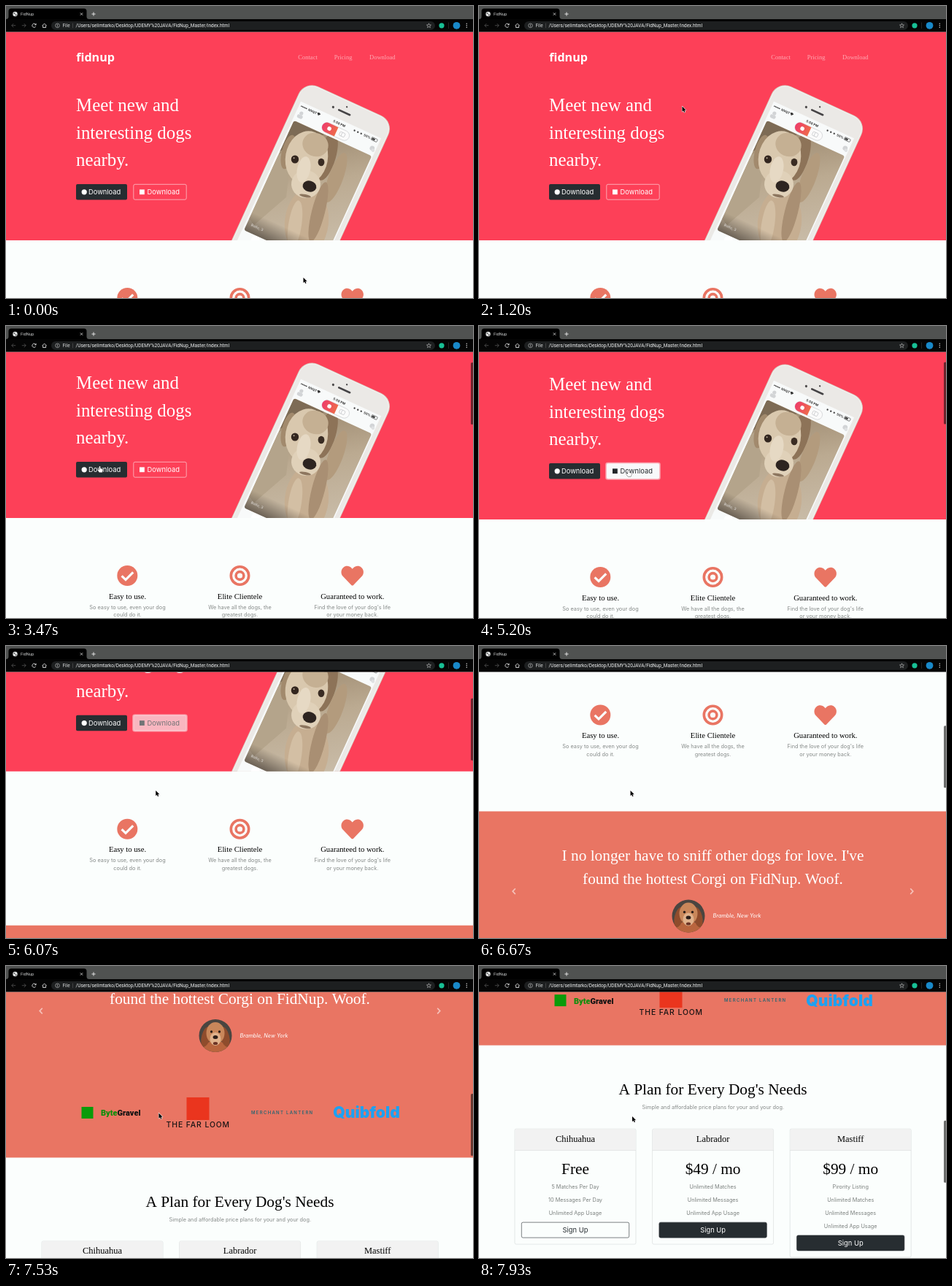
An HTML page with a canvas that plays this animation: 640x400 px, repeating every 8000 ms.

```html
<!DOCTYPE html>
<html lang="en">
<head>
<meta charset="utf-8">
<title>FidNup</title>
<style>
  html, body { margin: 0; width: 100%; height: 100%; overflow: hidden; background: #fbfefd; }
  canvas { display: block; width: 640px; height: 400px; }
</style>
</head>
<body>
<canvas id="stage"></canvas>
<script>
const LOOP = 8000, TOP = 35.5, HERO_END = 321;
const SERIF = '"Liberation Serif", Times, serif';
const SANS = 'Inter, sans-serif';
const UI = 'Roboto, sans-serif';
const RED = '#fd4058', CORAL = '#e97563', PAPER = '#fbfefd', DARK = '#272d31', GREY = '#868a89';

const canvas = document.getElementById('stage');
const ctx = canvas.getContext('2d');
const dpr = window.devicePixelRatio || 1;
canvas.width = 640 * dpr;
canvas.height = 400 * dpr;

// [time, value...] keys
const scrollKeys = [[0, 0], [1830, 0], [2130, 30], [2600, 55], [2900, 58], [3700, 58],
  [4200, 56], [5680, 56], [6070, 149], [7200, 460], [7930, 733.5], [8000, 757]];
const cursorKeys = [[0, 407.5, 372], [65, 407.5, 372], [135, 410, 306], [260, 410, 306],
  [1150, 278.5, 137.5], [2500, 278.5, 137.5], [3300, 128.5, 192], [3650, 128.5, 192],
  [4250, 204.5, 197], [5900, 205, 198], [7200, 209, 198], [7930, 210, 206]];

const clamp = v => Math.max(0, Math.min(1, v));
const ease = v => { v = clamp(v); return v * v * (3 - 2 * v); };
const mix = (a, b, k) => a + (b - a) * k;

function segment(keys, t) {
  let i = 0;
  while (i < keys.length - 2 && t >= keys[i + 1][0]) i++;
  return i;
}

// Monotone cubic through the scroll keys
function scrollAt(t) {
  const k = scrollKeys;
  const rate = i => k[i + 1] && k[i] ? (k[i + 1][1] - k[i][1]) / (k[i + 1][0] - k[i][0]) : 0;
  const slope = i => {
    const a = rate(i - 1), b = rate(i);
    return a * b > 0 ? 2 * a * b / (a + b) : 0;
  };
  const i = segment(k, t), h = k[i + 1][0] - k[i][0];
  const u = clamp((t - k[i][0]) / h), v = 1 - u;
  return v * v * (1 + 2 * u) * k[i][1] + u * u * (3 - 2 * u) * k[i + 1][1]
    + h * u * v * (v * slope(i) - u * slope(i + 1));
}

function cursorAt(t) {
  const i = segment(cursorKeys, t);
  const [t0, x0, y0] = cursorKeys[i], [t1, x1, y1] = cursorKeys[i + 1];
  const u = ease((t - t0) / (t1 - t0));
  return [mix(x0, x1, u), mix(y0, y1, u)];
}

function text(s, x, y, font, color, align = 'left', spacing = 0) {
  ctx.font = font;
  ctx.fillStyle = color;
  ctx.textAlign = align;
  ctx.letterSpacing = spacing + 'px';
  ctx.fillText(s, x, y);
}
function rect(x, y, w, h, color) {
  ctx.fillStyle = color;
  ctx.fillRect(x, y, w, h);
}
function round(x, y, w, h, r, fill, stroke, lw = 0.6) {
  ctx.beginPath();
  ctx.roundRect(x, y, w, h, r);
  paint(fill, stroke, lw);
}
function paint(fill, stroke, lw) {
  if (fill) { ctx.fillStyle = fill; ctx.fill(); }
  if (stroke) { ctx.strokeStyle = stroke; ctx.lineWidth = lw; ctx.stroke(); }
}
function oval(x, y, rx, ry, color, turn = 0) {
  ctx.beginPath();
  ctx.ellipse(x, y, rx, ry, turn, 0, 7);
  paint(color);
}
const disc = (x, y, r, color) => oval(x, y, r, r, color);
function ring(x, y, r, lw, color) {
  ctx.beginPath();
  ctx.arc(x, y, r, 0, 7);
  paint(null, color, lw);
}
function line(color, lw, ...p) {
  ctx.beginPath();
  for (let i = 0; i < p.length; i += 2) ctx.lineTo(p[i], p[i + 1]);
  paint(null, color, lw);
}
function poly(fill, ...p) {
  ctx.beginPath();
  for (let i = 0; i < p.length; i += 2) ctx.lineTo(p[i], p[i + 1]);
  ctx.closePath();
  paint(fill);
}
function shade(x0, y0, x1, y1, ...stops) {
  const g = ctx.createLinearGradient(x0, y0, x1, y1);
  stops.forEach((c, i) => g.addColorStop(i / (stops.length - 1), c));
  return g;
}
function within(draw, place) {
  ctx.save();
  place();
  draw();
  ctx.restore();
}

function browser() {
  rect(0, 0, 640, 18, '#505251');
  ctx.beginPath();
  ctx.moveTo(0, 18);
  ctx.quadraticCurveTo(3.5, 18, 3.5, 14.5);
  ctx.lineTo(3.5, 7);
  ctx.quadraticCurveTo(3.5, 3.5, 7, 3.5);
  ctx.lineTo(107, 3.5);
  ctx.quadraticCurveTo(110.5, 3.5, 110.5, 7);
  ctx.lineTo(110.5, 14.5);
  ctx.quadraticCurveTo(110.5, 18, 114, 18);
  paint('#000');
  rect(0, 18, 640, TOP - 18, '#050505');

  disc(12.5, 11, 3.2, '#e4e6e6');
  oval(11.5, 10, 1.2, 0.8, '#333');
  oval(13.6, 12.3, 1.1, 0.7, '#333');
  text('FidNup', 20, 13.1, '5.7px ' + UI, '#d2d4d4');
  line('#ddd', 0.8, 101.8, 9.3, 105.2, 12.7);
  line('#ddd', 0.8, 105.2, 9.3, 101.8, 12.7);
  line('#eee', 0.9, 117.4, 11, 122.6, 11);
  line('#eee', 0.9, 120, 8.4, 120, 13.6);

  for (const [x, d] of [[10.5, -1], [24.5, 1]]) {
    line('#555', 0.8, x - 2.7, 26.7, x + 2.7, 26.7);
    line('#555', 0.8, x + d * 0.3, 24.2, x + d * 2.7, 26.7, x + d * 0.3, 29.2);
  }
  ctx.beginPath();
  ctx.arc(38.5, 26.7, 2.6, 0.5, 5.6);
  paint(null, '#ddd', 0.9);
  poly('#ddd', 41.5, 23.6, 41.5, 26.2, 38.9, 26.2);
  line('#ddd', 0.9, 49.6, 27, 52.6, 24, 55.6, 27);
  line('#ddd', 0.9, 50.6, 26.6, 50.6, 29.5, 54.6, 29.5, 54.6, 26.6);

  round(62, 21, 526, 11.8, 5.9, '#1d1f20');
  ring(70.5, 26.8, 2.8, 0.6, '#d0d2d2');
  line('#d0d2d2', 0.7, 70.5, 26.4, 70.5, 28.4);
  rect(70.1, 25, 0.8, 0.8, '#d0d2d2');
  text('File', 77.5, 29.1, '6.4px ' + UI, '#d8dada');
  rect(91, 23.5, 0.5, 6.6, '#666');
  text('/Users/selimtarko/Desktop/UDEMY%20JAVA/FidNup_Master/index.html', 95.5, 29.1, '6.5px ' + UI, '#f2f4f4');

  ctx.beginPath();
  for (let i = 0; i < 10; i++) {
    const a = i * Math.PI / 5 - Math.PI / 2, r = i % 2 ? 1.4 : 3.2;
    ctx.lineTo(579.5 + r * Math.cos(a), 27 + r * Math.sin(a));
  }
  ctx.closePath();
  paint(null, '#ccc', 0.6);
  disc(597, 26.8, 3.6, '#17c095');
  rect(606, 22.5, 0.5, 8.5, '#444');
  disc(617.5, 26.8, 4.9, '#1989c9');
  for (const y of [24.3, 26.8, 29.3]) disc(631.3, y, 0.7, '#ddd');
}

function dogPhoto() {
  rect(300, 100, 240, 230, shade(390, 160, 420, 330, '#978369', '#bbaa91', '#c9bca8'));
  poly('#7d6b55', 390, 155, 436, 176, 390, 190, 374, 200);
  poly('#b4a48b', 372, 205, 392, 192, 384, 262, 340, 300, 332, 290);
  oval(440, 206, 12, 34, '#8d7358', 0.28);
  oval(452, 235, 10, 36, '#b39b7d', 0.35);
  oval(412, 296, 30, 46, '#c6ae91', 0.1);
  oval(428, 282, 9, 42, '#a98f73', 0.25);
  oval(396, 300, 9, 34, '#d3bfa4', 0.15);
  oval(387, 200, 9, 24, '#a28a6d', 0.25);
  oval(412, 208, 29, 37, '#d9c8ae', 0.18);
  oval(424, 190, 18, 16, '#c5b093', 0.4);
  oval(411, 244, 20, 19, '#e0d1b9', 0.15);
  oval(408, 224, 9, 18, '#e6d9c4', 0.2);
  oval(396, 210, 5.2, 5.6, '#33261f');
  oval(432, 214, 4.4, 5.2, '#3a2c23');
  disc(394.6, 208.2, 1, '#b9aa98');
  oval(416, 247, 9.5, 7.5, '#2d2420', 0.25);
  oval(410, 260, 8, 2, '#8d765f', 0.2);
}

function phone() {
  const place = () => { ctx.translate(470.9, 130.1); ctx.rotate(24.6 * Math.PI / 180); };
  within(() => {
    round(-67.7, 0, 135.4, 290, 20, '#d8cdc2');
    round(-66.3, 1.3, 132.6, 290, 19, '#ebe9e6', '#faf8f6', 0.8);
    rect(-60.5, 28.5, 121, 260, '#f8fafa');
    disc(-17, 17, 1.6, '#4c4a4b');
    disc(0, 9, 1.2, '#4c4a4b');
    round(-9.5, 16, 19, 2.6, 1.3, '#464446');
    const small = '700 4.4px ' + SANS;
    for (let i = 0; i < 5; i++) disc(-57 + i * 1.9, 34, 0.8, '#333');
    text('NVQT', -46.5, 35.7, small, '#333');
    ctx.beginPath();
    ctx.moveTo(-31, 36);
    ctx.arc(-31, 36, 3.8, -2.3, -0.84);
    paint('#333');
    text('5:58 PM', 0, 35.7, small, '#333', 'center');
    for (let i = 0; i < 3; i++) disc(23 + i * 5, 34, 1.2, '#444');
    text('50%', 37, 35.7, small, '#333');
    round(48.5, 32, 8.5, 4, 0.8, null, '#444', 0.6);
    rect(49.2, 32.7, 4.5, 2.6, '#444');
    disc(-53, 43, 2.6, '#d2d4d6');
    round(-57, 45.4, 8, 5, 2.4, '#d2d4d6');
    disc(55, 46, 3.3, '#d2d4d6');
    disc(57.2, 48.2, 2.3, '#dfe1e2');
    round(-20, 39.2, 40, 13.6, 6.8, '#fbfbfb', '#cfd0d2', 0.7);
    round(-20, 39.2, 21, 13.6, [6.8, 0, 0, 6.8], shade(-20, 0, 1, 0, '#ee3d6a', '#ee6a4c'));
    disc(-9.5, 46, 2.8, '#fff');
    round(6, 43.2, 4.6, 5.4, 1, null, '#c3c5c8', 0.7);
    round(9, 43.2, 4.6, 5.4, 1, '#fbfbfb', '#c3c5c8', 0.7);
    disc(-38, 227, 6, '#fff');
  }, place);
  within(dogPhoto, () => {
    within(() => {}, () => {});
    const m = ctx.getTransform();
    place();
    ctx.beginPath();
    ctx.roundRect(-58, 56, 117, 165, 3);
    ctx.clip();
    ctx.setTransform(m);
  });
  within(() => {
    round(-58, 194, 117, 27, [0, 0, 3, 3], shade(0, 194, 0, 221, 'rgba(50,42,36,0)', 'rgba(50,42,36,.6)'));
    text('Rollo, 3', -52, 212, '600 5px ' + SANS, 'rgba(255,255,255,.6)');
  }, place);
}

function downloadButtons(hover, focus) {
  const font = '9.35px ' + SANS;
  round(96, 244, 70, 21.5, 2, DARK);
  disc(107.2, 254.8, 3.6, '#fff');
  text('Download', 113, 258.1, font, '#fff');
  if (focus) round(173.2, 242.8, 75.6, 23.9, 3.2, `rgba(248,249,250,${0.5 * focus})`);
  if (focus) round(174.6, 244.2, 72.8, 21.1, 2, RED);
  const c = [33, 37, 41].map(v => Math.round(mix(255, v, hover)));
  const ink = `rgb(${c})`;
  round(174.8, 244.3, 72.4, 20.9, 2, `rgba(248,249,250,${hover})`, '#fbeff0', 0.6);
  rect(183, 251.4, 6.8, 6.8, ink);
  text('Download', 193.6, 258.1, font, ink);
}

function hero(hover, focus) {
  rect(0, 0, 640, HERO_END, RED);
  text('fidnup', 96.3, 75.8, '700 16.1px "Open Sans", sans-serif', '#fff');
  [['Contact', 400.3], ['Pricing', 449.8], ['Download', 498]].forEach(([s, x]) =>
    text(s, x, 72.6, '8.53px ' + SERIF, 'rgba(255,255,255,.55)'));
  ['Meet new and', 'interesting dogs', 'nearby.'].forEach((s, i) =>
    text(s, 96, 144.2 + i * 37.4, '24.9px ' + SERIF, '#fff'));
  downloadButtons(hover, focus);
  within(phone, () => { ctx.beginPath(); ctx.rect(0, 0, 640, HERO_END); ctx.clip(); });
}

const heart = new Path2D('M462 63C408 16 326 24 276 76L256 97L236 76C186 24 105 16 50 63C-13 116-16 212 40 270L233 470C246 483 266 483 279 470L472 270C528 212 525 116 462 63Z');

function features() {
  disc(166.3, 400, 14, CORAL);
  ctx.lineJoin = 'miter';
  line(PAPER, 3.2, 158.6, 400.4, 164, 405.6, 174.2, 395.4);
  ring(320.5, 400, 12.2, 3.6, CORAL);
  ring(320.5, 400, 5.4, 3.6, CORAL);
  within(() => { ctx.fillStyle = CORAL; ctx.fill(heart); }, () => {
    ctx.translate(474.7, 400.2);
    ctx.scale(0.0595, 0.0595);
    ctx.translate(-256, -256);
  });
  [
    [166.5, 'Easy to use.', 'So easy to use, even your dog', 'could do it.'],
    [320.5, 'Elite Clientele', 'We have all the dogs, the', 'greatest dogs.'],
    [474.8, 'Guaranteed to work.', "Find the love of your dog's life", 'or your money back.']
  ].forEach(([x, head, a, b]) => {
    text(head, x, 431.6, '10.67px ' + SERIF, '#000', 'center');
    text(a, x, 445.6, '7.3px ' + SANS, GREY, 'center');
    text(b, x, 456.2, '7.3px ' + SANS, GREY, 'center');
  });
}

function portrait() {
  disc(287, 675.5, 22.5, '#4a4540');
  within(() => {
    oval(287, 700, 19, 18, '#b9653e');
    oval(274, 677, 6, 14, '#8f4c2c', 0.25);
    oval(300, 677, 6, 14, '#8f4c2c', -0.25);
    oval(287, 672, 12.5, 15, '#c9875a');
    oval(287, 680, 7.5, 9, '#e0b28c');
    oval(281.5, 670, 1.7, 1.8, '#2b1d18');
    oval(292.5, 670, 1.7, 1.8, '#2b1d18');
    oval(287, 677.5, 3.4, 2.5, '#2b1d18');
    oval(287, 686, 3.2, 2, '#6b3326');
  }, () => { ctx.beginPath(); ctx.arc(287, 675.5, 22.5, 0, 7); ctx.clip(); });
}

function testimonial() {
  rect(0, 532, 640, 310.5, CORAL);
  ["I no longer have to sniff other dogs for love. I've", 'found the hottest Corgi on FidNup. Woof.'].forEach((s, i) =>
    text(s, 320.5, 599.6 + i * 32, '21.33px ' + SERIF, '#fff', 'center'));
  portrait();
  text('Bramble, New York', 320.5, 677.8, 'italic 7.3px ' + SANS, '#fff');
  for (const [x, d] of [[48, -1], [593, 1]])
    line('rgba(255,255,255,.55)', 1.7, x - d * 1.8, 637.8, x + d * 1.8, 641.6, x - d * 1.8, 645.4);

  rect(103.5, 773, 16, 16, '#0a9b0a');
  const bold = '900 11px ' + UI;
  text('Byte', 130, 785.4, bold, '#0a8f0a');
  text('Gravel', 130 + ctx.measureText('Byte').width, 785.4, bold, '#111');
  rect(247.5, 760, 31, 31, '#ea351e');
  text('THE FAR LOOM', 263.3, 801, '500 10.4px ' + SANS, '#1a1414', 'center', 0.9);
  text('MERCHANT LANTERN', 378.7, 783, '600 6px ' + SANS, '#2f6672', 'center', 1.3);
  text('Quibfold', 494, 788.4, '900 21px ' + SANS, '#1da1f2', 'center');
}

function card(x, name, price, perks, filled) {
  const top = 957, button = 1067.2 + perks.length * 17.8 - 35.6;
  round(x, top, 166, button + 30 - top, 2, PAPER, '#d6d9d9', 0.6);
  round(x + 0.3, top + 0.3, 165.4, 29, [2, 2, 0, 0], '#f2f2f2');
  rect(x, top + 29.3, 166, 0.6, '#d6d9d9');
  const mid = x + 83;
  text(name, mid, 974.5, '12.44px ' + SERIF, '#000', 'center');
  text(price, mid, 1018.8, '21.33px ' + SERIF, '#000', 'center');
  perks.forEach((s, i) => text(s, mid, 1039 + i * 17.8, '7.3px ' + SANS, '#7c807f', 'center'));
  round(x + 9.3, button, 147.4, 21, 2, filled ? DARK : PAPER, DARK, 0.6);
  text('Sign Up', mid, button + 13.9, '9.35px ' + SANS, filled ? '#fff' : DARK, 'center');
}

function pricing() {
  text("A Plan for Every Dog's Needs", 320.5, 910, '21.33px ' + SERIF, '#000', 'center');
  text('Simple and affordable price plans for your and your dog.', 320.8, 930, '7.3px ' + SANS, GREY, 'center');
  const all = ['Unlimited Matches', 'Unlimited Messages', 'Unlimited App Usage'];
  card(49, 'Chihuahua', 'Free', ['5 Matches Per Day', '10 Messages Per Day', all[2]], false);
  card(237.6, 'Labrador', '$49 / mo', all, true);
  card(426.2, 'Mastiff', '$99 / mo', ['Pirority Listing', ...all], true);
}

const arrow = new Path2D('M0 0V7.2L1.7 5.7L2.8 8.2L4 7.7L2.9 5.3H5.2Z');
const hand = new Path2D('M-.8 .5Q0-.6 .8 .5V3.2L3.6 3.9Q4.4 4.2 4.2 5.2L3.5 8.4H-.7L-2.9 5.2Q-3 4-1.8 4.5L-.8 5.4Z');

function pointer(x, y, over) {
  within(() => {
    ctx.lineJoin = 'round';
    ctx.lineWidth = over ? 0.8 : 1.1;
    ctx.strokeStyle = over ? '#222' : 'rgba(255,255,255,.9)';
    ctx.fillStyle = over ? '#fff' : '#000';
    const shape = over ? hand : arrow;
    ctx.stroke(shape);
    ctx.fill(shape);
  }, () => ctx.translate(x, y));
}

function draw(t) {
  const s = scrollAt(t), [x, y] = cursorAt(t);
  const hover = ease((t - 4150) / 150) * (1 - ease((t - 6010) / 150));
  const focus = ease((t - 4600) / 150);
  ctx.setTransform(dpr, 0, 0, dpr, 0, 0);
  rect(0, 0, 640, 400, PAPER);
  within(() => {
    if (s < HERO_END) hero(hover, focus);
    features();
    testimonial();
    pricing();
  }, () => {
    ctx.beginPath();
    ctx.rect(0, TOP, 640, 400);
    ctx.clip();
    ctx.translate(0, -s);
  });
  const bar = ease((t - 1830) / 80);
  if (bar) round(637, 36 + s * 0.2395, 3.4, 85, 1.5, `rgba(20,20,20,${0.62 * bar})`);
  browser();
  const dy = y + s;
  const over = dy > 244 && dy < 266 && (x > 96 && x < 166 || x > 174 && x < 248);
  pointer(x, y, over);
}

const start = performance.now();
function tick() {
  draw((performance.now() - start) % LOOP);
  requestAnimationFrame(tick);
}
tick();
</script>
</body>
</html>
```
